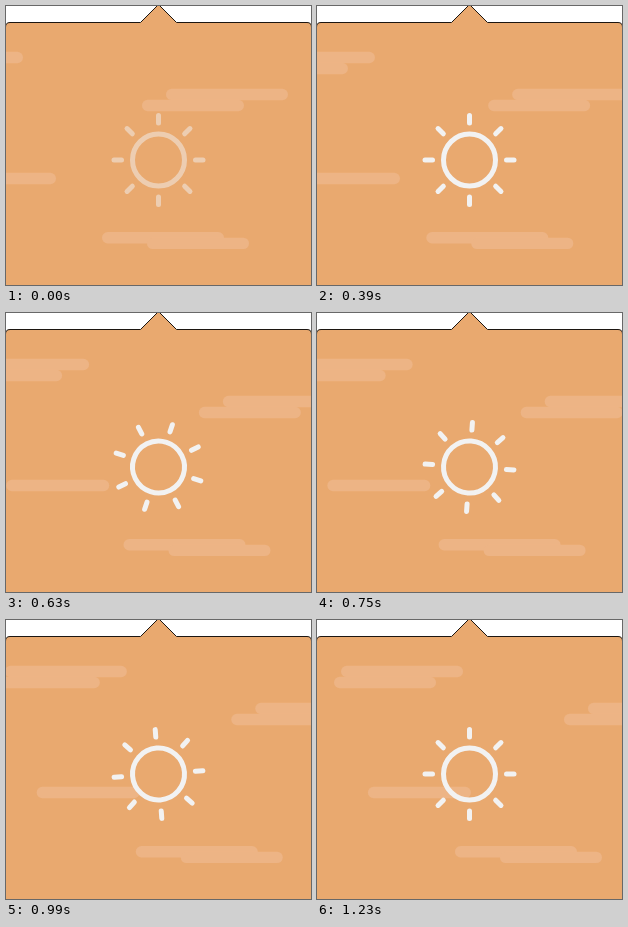
Animation of 305x279 px, one loop 1.26 s. Source, as an HTML page:

```html
<!DOCTYPE html>
<html lang="en">
<head>
<meta charset="utf-8">
<title>Sunny</title>
<style>
  html, body { margin: 0; width: 100%; height: 100%; overflow: hidden; background: #fff; }
  svg { display: block; width: 100%; height: 100%; }
</style>
</head>
<body>
<svg viewBox="0 0 305 279">
  <path d="M-.5 285V21Q-.5 16.5 4 16.5H134.5L152.5 -1.5L170.500 16.5H301Q305.500 16.5 305.500 21V285Z"
        fill="#e9a96f" stroke="#1c1611"/>
  <g id="clouds" stroke="#edb485" stroke-width="11.4" stroke-linecap="round"></g>
  <g id="sun" fill="none" stroke="#f2f2f2" stroke-width="5" stroke-linecap="round">
    <circle r="26"/>
  </g>
</svg>
<script>
const LOOP = 1260, STEP = 30;
const SPIN_START = 460, SPIN_TIME = 574, FADE_TIME = 270;
const sun = document.getElementById('sun');
const clouds = document.getElementById('clouds');

function add(parent, tag, attrs = {}) {
  const el = document.createElementNS('http://www.w3.org/2000/svg', tag);
  for (const name in attrs) el.setAttribute(name, attrs[name]);
  return parent.appendChild(el);
}

// Each bar is [left, middle y, width]; speed is in pixels per ms.
const drifting = [
  { speed: 0.0902, bars: [[160, 88.5, 122], [136, 99.5, 102]] },
  { speed: 0.1049, bars: [[-105, 51.5, 122], [-112, 62.5, 102]] },
  { speed: 0.0845, bars: [[-53, 172.5, 103]] },
  { speed: 0.0341, bars: [[96, 231.8, 122], [141, 237.4, 102]] }
].map(({ speed, bars }) => {
  const group = add(clouds, 'g');
  for (const [x, y, w] of bars)
    add(group, 'line', { x1: x + 5.7, x2: x + w - 5.7, y1: y, y2: y });
  return { speed, group };
});

for (let angle = 0; angle < 360; angle += 45)
  add(sun, 'line', { x1: 37, x2: 44.5, transform: `rotate(${angle})` });

const clamp = u => Math.min(1, Math.max(0, u));
const easeOut = u => 1 - (1 - u) ** 2;
const easeInOut = u => u < 0.5 ? 2 * u * u : 1 - 2 * (1 - u) ** 2;

function draw(now) {
  const t = Math.floor(now % LOOP / STEP) * STEP;
  for (const { speed, group } of drifting)
    group.setAttribute('transform', `translate(${speed * t})`);
  const spin = 360 * easeInOut(clamp((t - SPIN_START) / SPIN_TIME));
  sun.setAttribute('transform', `translate(152.5 154) rotate(${spin})`);
  sun.setAttribute('opacity', 0.5 + 0.5 * easeOut(clamp(t / FADE_TIME)));
}

const start = performance.now();
function tick() {
  draw(performance.now() - start);
  requestAnimationFrame(tick);
}
tick();
</script>
</body>
</html>
```
